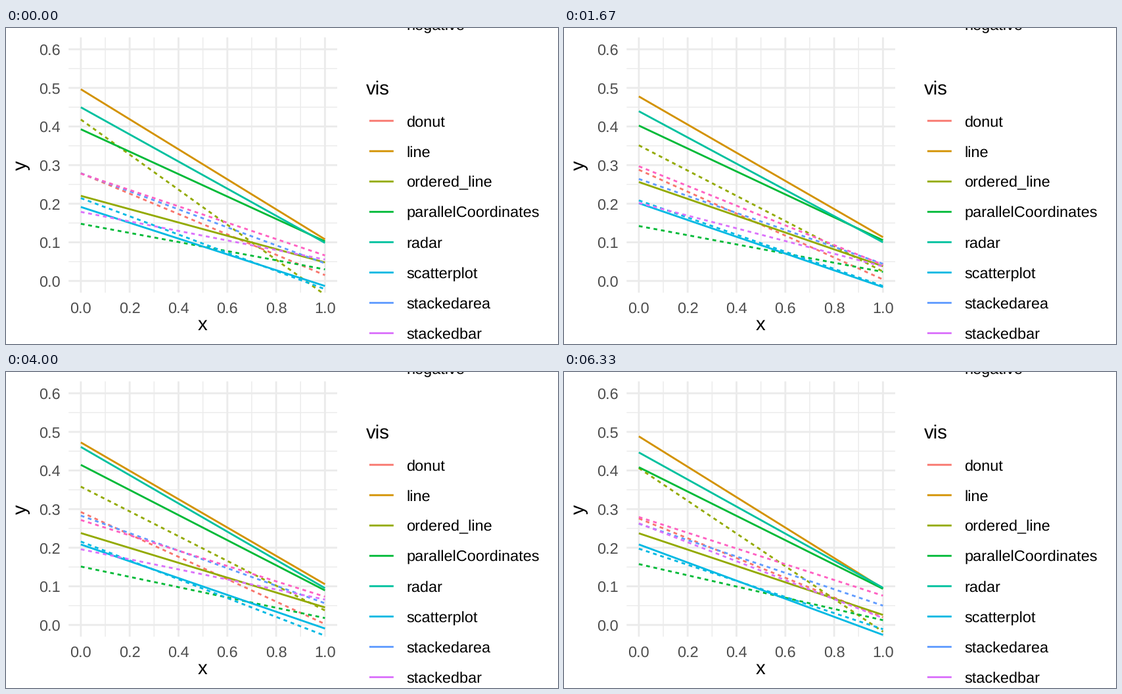
Animation of 840 by 480 pixels, one loop 6670 ms. Source, as a matplotlib script:

```python
import numpy as np
import matplotlib.pyplot as plt
from matplotlib.animation import FuncAnimation
from matplotlib.patches import Rectangle

plt.rcParams["font.family"] = "Liberation Sans"
plt.rcParams["text.hinting"] = "none"

W, H, DPI = 840, 480, 80
PX = 72 / DPI                      # one pixel in points
LOOP_MS, TICK_MS, DRAWS = 6670, 29, 20
LEAD_MS = 36                       # switch on the tick just before a draw is due
LEFT, RIGHT, TOP, BOTTOM = 95.3, 504.0, 14.3, 402.0
X0, X1 = 113.9, 485.4              # pixels of x = 0 and x = 1
Y0, Y_UNIT = 384.2, 586.5          # pixel of y = 0, pixels per unit
THICK, THIN = 2.85, 1.42
SMALL, LARGE = 23.47, 29.33
GRID, GRAY = "#EBEBEB", "#4D4D4D"

COLORS = {
    "donut": "#F8766D",
    "line": "#D39200",
    "ordered_line": "#93AA00",
    "parallelCoordinates": "#00BA38",
    "radar": "#00C19F",
    "scatterplot": "#00B9E3",
    "stackedarea": "#619CFF",
    "stackedbar": "#DB72FB",
    "stackedline": "#FF61C3",
}

# Name, line style, mean height at x = 0 and x = 1, spread of the draws
FITS = [
    ("donut", "--", 0.288, 0.015, 0.014),
    ("line", "-", 0.486, 0.107, 0.014),
    ("ordered_line", "-", 0.238, 0.040, 0.018),
    ("ordered_line", "--", 0.346, 0.025, 0.045),
    ("parallelCoordinates", "-", 0.400, 0.098, 0.011),
    ("parallelCoordinates", "--", 0.155, 0.020, 0.008),
    ("radar", "-", 0.437, 0.108, 0.015),
    ("scatterplot", "-", 0.186, -0.006, 0.014),
    ("scatterplot", "--", 0.217, -0.020, 0.015),
    ("stackedarea", "--", 0.283, 0.045, 0.014),
    ("stackedbar", "--", 0.222, 0.036, 0.027),
    ("stackedline", "--", 0.306, 0.045, 0.027),
]

rng = np.random.default_rng(4)


def sample(start, end, spread):
    """Random fits: a line that starts higher tends to end lower."""
    lift, noise = np.clip(rng.standard_normal((2, DRAWS)), -1.6, 1.6)
    starts = start + spread * lift
    ends = end + spread * 0.5 * (noise - lift)
    return np.column_stack([starts, ends])


fig = plt.figure(figsize=(W / DPI, H / DPI), dpi=DPI, facecolor="white")
ax = fig.add_axes([0, 0, 1, 1])
ax.set_xlim(0, W)
ax.set_ylim(H, 0)
ax.axis("off")


def px_x(x):
    return X0 + x * (X1 - X0)


def px_y(y):
    return Y0 - y * Y_UNIT


def stroke(xs, ys, color, width=THICK, style="-"):
    dash = (0, (2, 2)) if style == "--" else "-"
    line, = ax.plot(xs, ys, color=color, lw=width * PX, ls=dash, snap=False,
                    solid_capstyle="butt", dash_capstyle="butt")
    return line


def label(x, baseline, text, size=SMALL, color="black", ha="left", angle=0):
    ax.text(x, baseline, text, fontsize=size * PX, color=color, ha=ha,
            va="baseline", rotation=angle, rotation_mode="anchor")


def grid(xs, ys, width):
    for y in ys:
        stroke([LEFT, RIGHT], [px_y(y)] * 2, GRID, width)
    for x in xs:
        stroke([px_x(x)] * 2, [TOP, BOTTOM], GRID, width)


x_ticks = np.arange(6) / 5
y_ticks = np.arange(7) / 10
grid(x_ticks[:-1] + 0.1, y_ticks[:-1] + 0.05, THIN)
grid(x_ticks, y_ticks, THICK)
for x in x_ticks:
    label(px_x(x), 432.4, f"{x:.1f}", color=GRAY, ha="center")
for y in y_ticks:
    label(82.3, px_y(y) + 8.4, f"{y:.1f}", color=GRAY, ha="right")
label(299, 458.8, "x", LARGE, ha="center")
label(31, 208.3, "y", LARGE, ha="center", angle=90)

label(609, 3, "negative")
label(548.3, 100.5, "vis", LARGE)
for i, (name, color) in enumerate(COLORS.items()):
    y = 141 + 46.08 * i
    stroke([552.9, 589.8], [y, y], color)
    label(609, y + 8.4, name)

panel = Rectangle((LEFT, TOP), RIGHT - LEFT, BOTTOM - TOP,
                  transform=ax.transData)
lines, heights = [], []
for name, style, start, end, spread in FITS:
    line = stroke([X0, X1], [Y0, Y0], COLORS[name], style=style)
    line.set_clip_path(panel)
    lines.append(line)
    heights.append(sample(start, end, spread))


def update(tick):
    draw = int((tick * TICK_MS + LEAD_MS) * DRAWS / LOOP_MS)
    draw = min(draw, DRAWS - 1)
    for line, ys in zip(lines, heights):
        line.set_ydata(px_y(ys[draw]))
    return lines


anim = FuncAnimation(fig, update, frames=LOOP_MS // TICK_MS, interval=TICK_MS,
                     repeat=True, repeat_delay=0)
plt.show()
```
